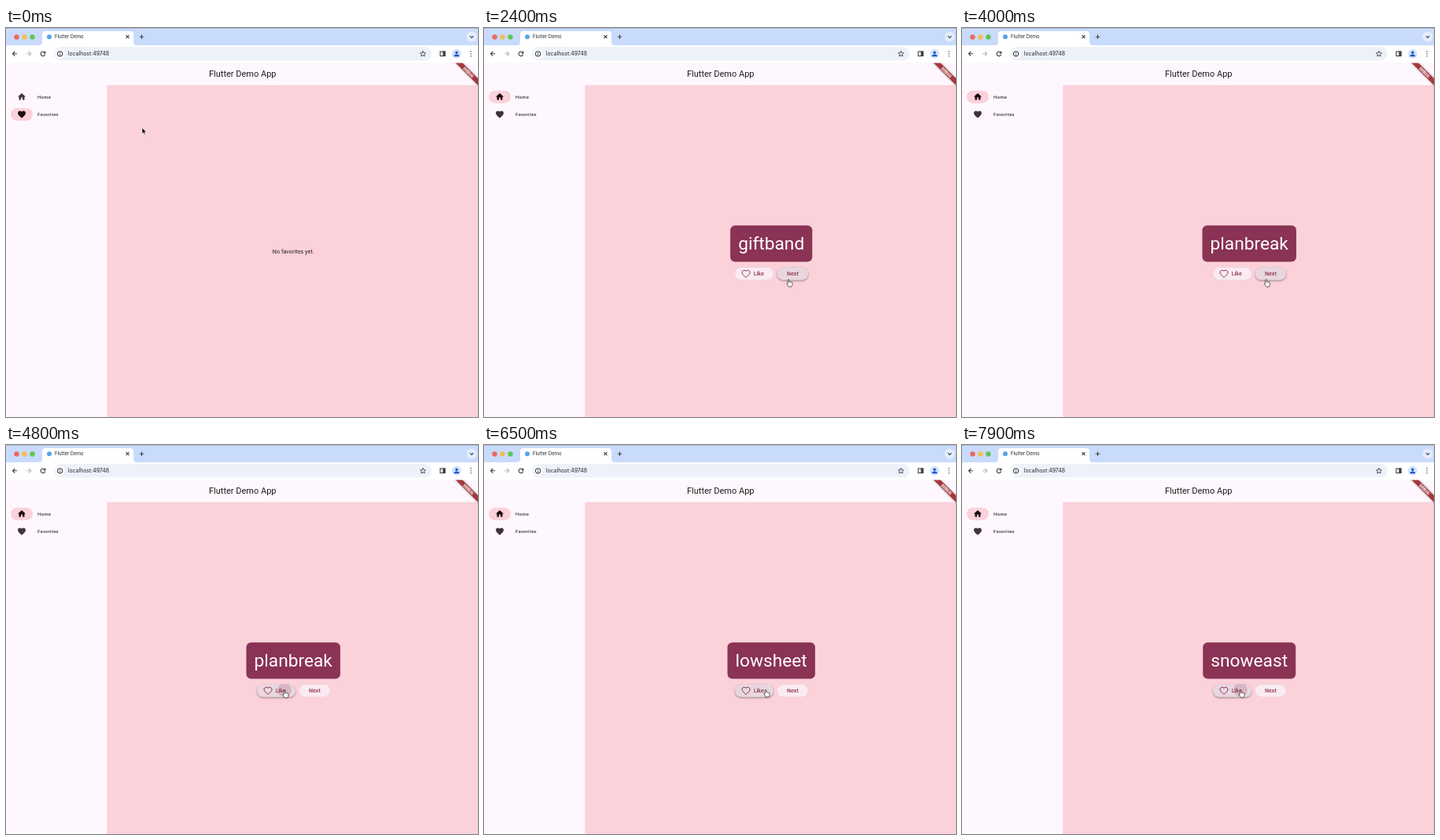
Write an HTML page that moves like this. It is 600 px wide and 495 px high and loops after 8 s.

```html
<!DOCTYPE html>
<html lang="en">
<head>
<meta charset="utf-8">
<title>Flutter Demo</title>
<style>
  html, body { margin: 0; width: 100%; height: 100%; overflow: hidden; background: #fef8fe; }
  svg { display: block; }
  text { font-family: Roboto, sans-serif; fill: #1f1a1c; white-space: pre; }
  .ui { font-family: Inter, sans-serif; fill: #1f2328; }
  .line { fill: none; stroke: #3c4043; stroke-width: 1.1; }
  .rail { font-size: 6px; font-weight: 500; letter-spacing: .25px; fill: #40353a; }
  .label { font-size: 7px; font-weight: 500; letter-spacing: .05px; fill: #8c3354; }
</style>
</head>
<body>
<svg width="600" height="495" viewBox="0 0 600 495">
  <defs>
    <path id="heart" d="M12 21.35l-1.45-1.32C5.4 15.36 2 12.28 2 8.5 2 5.42 4.42 3 7.5 3c1.74 0 3.41.81 4.5 2.09C13.09 3.81 14.76 3 16.5 3 19.58 3 22 5.42 22 8.5c0 3.78-3.4 6.86-8.55 11.54z"/>
    <clipPath id="likeClip"><rect x="319" y="304.5" width="49" height="16.3" rx="8.15"/></clipPath>
    <clipPath id="nextClip"><rect x="372.7" y="304.5" width="39.3" height="16.3" rx="8.15"/></clipPath>
    <clipPath id="appClip"><rect y="44.5" width="600" height="450.5"/></clipPath>
  </defs>

  <!-- browser window -->
  <rect width="600" height="23" fill="#c9dbfc"/>
  <rect width="600" height=".7" fill="#a4adb8"/>
  <circle cx="13.5" cy="11.5" r="3.2" fill="#ec6a5e"/>
  <circle cx="23.5" cy="11.5" r="3.2" fill="#f4bf4f"/>
  <circle cx="33.5" cy="11.5" r="3.2" fill="#61c554"/>
  <path d="M42 22q4 0 4-4V8q0-4 4-4h108q4 0 4 4v10q0 4 4 4z" fill="#fff"/>
  <circle cx="55" cy="11.3" r="3" fill="#54a5ea"/>
  <text class="ui" x="62" y="13.4" font-size="6">Flutter Demo</text>
  <path class="line" d="M152.5 9.2l4 4m0-4l-4 4M172.5 8.5v5.4m-2.7-2.7h5.4"/>
  <circle cx="592" cy="11.2" r="6.5" fill="#e3edfd"/>
  <path class="line" d="M589.8 10.2l2.2 2.2 2.2-2.2"/>
  <rect y="22" width="600" height="22.5" fill="#fff"/>
  <rect x="61" y="24" width="480" height="17.5" rx="8.7" fill="#edf2fa"/>
  <path class="line" d="M14.2 32.8H8.6m2.7-2.8l-2.8 2.8 2.8 2.8"/>
  <path class="line" style="stroke:#b4b7ba" d="M26 32.8h5.6M29 30l2.8 2.8-2.8 2.8"/>
  <path class="line" d="M49.3 31.3a2.8 2.8 0 1 0 .4 2.2M49.9 29.6v2.3h-2.3"/>
  <circle cx="68.6" cy="32.8" r="6" fill="#fff"/>
  <circle class="line" cx="68.6" cy="32.8" r="3.1" stroke-width=".8"/>
  <path class="line" d="M68.6 32.4v2.2m0-3.8v.9"/>
  <text class="ui" x="78.8" y="35.3" font-size="6.9">localhost:49748</text>
  <path class="line" style="stroke-width:.9" d="M530 29.4l1 2.3 2.5.2-1.9 1.7.6 2.4-2.2-1.3-2.2 1.3.6-2.4-1.9-1.7 2.5-.2z"/>
  <rect class="line" x="552" y="30" width="6" height="5.6"/>
  <rect x="555.3" y="29.6" width="3.2" height="6.4" fill="#3c4043"/>
  <circle cx="572.8" cy="32.8" r="6" fill="#d3e3fd"/>
  <path d="M569.4 36.2q0-2.7 3.4-2.7t3.4 2.7z" fill="#1a56c4"/>
  <circle cx="572.8" cy="31.2" r="1.7" fill="#1a56c4"/>
  <path d="M591 29.8h.01m-.01 3h.01m-.01 3h.01" stroke="#3c4043" stroke-width="1.5" stroke-linecap="round"/>

  <!-- app -->
  <rect y="44.5" width="600" height="450.5" fill="#fef8fe"/>
  <text x="300.8" y="62.4" font-size="11" text-anchor="middle">Flutter Demo App</text>
  <rect x="128.3" y="72.7" width="472" height="423" fill="#fbd1da"/>
  <rect id="homePill" x="6" y="79.7" width="28" height="16" rx="8"/>
  <rect id="favPill" x="6" y="102" width="28" height="16" rx="8" fill="#fbd1da"/>
  <path id="homeIcon" transform="translate(14 81.5) scale(.5)" d="M10 20v-6h4v6h5v-8h3L12 3 2 12h3v8z"/>
  <use id="favIcon" href="#heart" transform="translate(14 104) scale(.5)"/>
  <text class="rail" x="40" y="89.8">Home</text>
  <text class="rail" x="40" y="112">Favorites</text>

  <text id="empty" x="365.3" y="287.4" font-size="7" letter-spacing=".125" text-anchor="middle">No favorites yet.</text>
  <g id="home">
    <rect id="card" y="251.2" height="46.2" rx="6" fill="#8a3354"/>
    <text id="word" x="365.2" y="281.8" font-size="22.7" text-anchor="middle" style="fill:#fff"></text>
    <rect id="like" x="319" y="304.5" width="49" height="16.3" rx="8.15"/>
    <rect id="next" x="372.7" y="304.5" width="39.3" height="16.3" rx="8.15"/>
    <g clip-path="url(#likeClip)"><circle class="ripple" fill="#8a3354"/></g>
    <g clip-path="url(#nextClip)"><circle class="ripple" fill="#8a3354"/></g>
    <use id="likeIcon" href="#heart" transform="translate(327 306.8) scale(.5)" stroke="#8c3354" stroke-width="2"/>
    <text class="label" x="342.7" y="315.2">Like</text>
    <text class="label" x="385" y="315.2">Next</text>
  </g>

  <g clip-path="url(#appClip)">
    <g transform="translate(600 44.5) rotate(45)" style="filter:drop-shadow(0 0 1.5px #0006)">
      <rect x="-22" y="14" width="44" height="6" fill="#a3393e"/>
      <text y="18.8" font-size="5.1" font-weight="900" text-anchor="middle" style="fill:#fff">DEBUG</text>
    </g>
  </g>

  <!-- pointer -->
  <circle id="ring" r="15.6" fill="none" stroke="#111" stroke-width="1.2"/>
  <path id="arrow" d="M0 0v7.6l1.8-1.6 1.2 2.7 1.3-.6-1.2-2.6h2.4z" fill="#000" stroke="#fff" stroke-width=".6"/>
  <path id="hand" d="M-.8 .8q.8-1.1 1.6 0v3q.8-.6 1.4.1.8-.5 1.4.2 1.2-.3 1.4.9v2q-.3 1.3-1 2.7H.2Q-.6 8-2.1 6.2q-.2-1.4 1.3-.5z" fill="#fff" stroke="#222" stroke-width=".7" stroke-linejoin="round"/>
</svg>
<script>
const LOOP = 8000, STEP = 100;
const $ = id => document.getElementById(id);
const set = (el, attrs) => { for (const k in attrs) el.setAttribute(k, attrs[k]); };
const clamp = v => Math.min(1, Math.max(0, v));

// pointer path: time, x, y
const path = [
  [0, 173, 127], [100, 171, 105], [300, 171, 105], [800, 140, 101], [900, 140, 101],
  [1200, 57, 87], [1500, 57, 87], [2300, 387, 319.5], [3800, 386.5, 319.5], [4400, 386.5, 319.5],
  [4700, 354, 312], [4900, 354, 312], [5100, 391, 312], [5300, 391, 312],
  [5500, 353, 311.5], [5900, 353, 311.5], [6100, 390, 312], [6300, 390, 312],
  [6500, 358, 311], [6900, 358, 311], [7100, 390, 311.5], [7300, 390, 311.5],
  [7700, 354, 311.5], [8000, 354, 311.5]
];
const clicks = [1400, 2900, 3700, 4800, 5200, 5900, 6200, 6800, 7200, 7900];
const likes = [[4900, 5300], [6000, 6300], [6900, 7300]];
const words = [[0, 'giftband'], [3000, 'warmtree'], [3800, 'planbreak'],
  [5300, 'ranchfall'], [6300, 'lowsheet'], [7300, 'snoweast']];
const HOME_AT = 1500;

function pointerAt(t) {
  const i = path.findIndex(p => p[0] > t);
  const [t0, x0, y0] = path[i - 1], [t1, x1, y1] = path[i];
  const u = (t - t0) / (t1 - t0), e = u * u * (3 - 2 * u);
  return [x0 + (x1 - x0) * e, y0 + (y1 - y0) * e];
}

function textWidth(word) {
  $('word').textContent = word;
  return $('word').getComputedTextLength();
}

function drawCard(t) {
  const i = words.findLastIndex(w => w[0] <= t);
  const before = textWidth(words[Math.max(0, i - 1)][1]);
  const now = textWidth(words[i][1]);
  const width = before + (now - before) * clamp((t - words[i][0]) / 200) + 20.2;
  set($('card'), { x: 365.2 - width / 2, width });
}

function drawButton(id, hovered) {
  $(id).style.fill = hovered ? '#e9d7df' : '#f9ebf1';
  $(id).style.filter = hovered
    ? 'drop-shadow(0 1px 1px #0006)' : 'drop-shadow(0 .4px .5px #0003)';
}

function draw(t) {
  const [x, y] = pointerAt(t);
  const atHome = t >= HOME_AT;
  const inRow = y > 304 && y < 321;
  const overHome = x < 128 && y > 77 && y < 98;
  const overLike = atHome && inRow && x > 319 && x < 368;
  const overNext = atHome && inRow && x > 372 && x < 412;

  const shown = clamp((t - HOME_AT + STEP) / 300);
  $('home').style.opacity = atHome ? shown : 0;
  $('empty').style.opacity = atHome ? 1 - shown : 1;
  $('homePill').style.fill = atHome ? '#fbd1da' : overHome ? '#efe8ed' : 'none';
  $('favPill').style.opacity = atHome ? 0 : 1;
  $('homeIcon').style.fill = atHome ? '#1d0a12' : '#47343b';
  $('favIcon').style.fill = atHome ? '#40343a' : '#1d0a12';

  drawCard(t);
  drawButton('like', overLike);
  drawButton('next', overNext);
  const liked = likes.some(([from, to]) => t >= from && t < to);
  $('likeIcon').style.fill = liked ? '#8c3354' : 'none';

  const click = clicks.findLast(c => c <= t);
  const age = t - click;
  const [cx, cy] = click ? pointerAt(click) : [0, 0];
  const alpha = age < 300 && click > HOME_AT ? .2 * (1 - age / 300) : 0;
  document.querySelectorAll('.ripple').forEach((el, i) => {
    const hit = i ? cx > 370 : cx < 370;
    set(el, { cx, cy, r: 9 + (age || 0) * .12, opacity: hit ? alpha : 0 });
  });

  const pressed = clicks.some(c => t >= c - STEP && t < c);
  set($('ring'), { cx: x, cy: y, visibility: pressed ? 'visible' : 'hidden' });
  const pointing = overHome || overLike || overNext;
  const transform = `translate(${x} ${y})`;
  set($('arrow'), { transform, visibility: pointing ? 'hidden' : 'visible' });
  set($('hand'), { transform, visibility: pointing ? 'visible' : 'hidden' });
}

const start = performance.now();
function frame() {
  const t = (performance.now() - start) % LOOP;
  draw(Math.floor(t / STEP) * STEP);
  requestAnimationFrame(frame);
}
frame();
</script>
</body>
</html>
```
